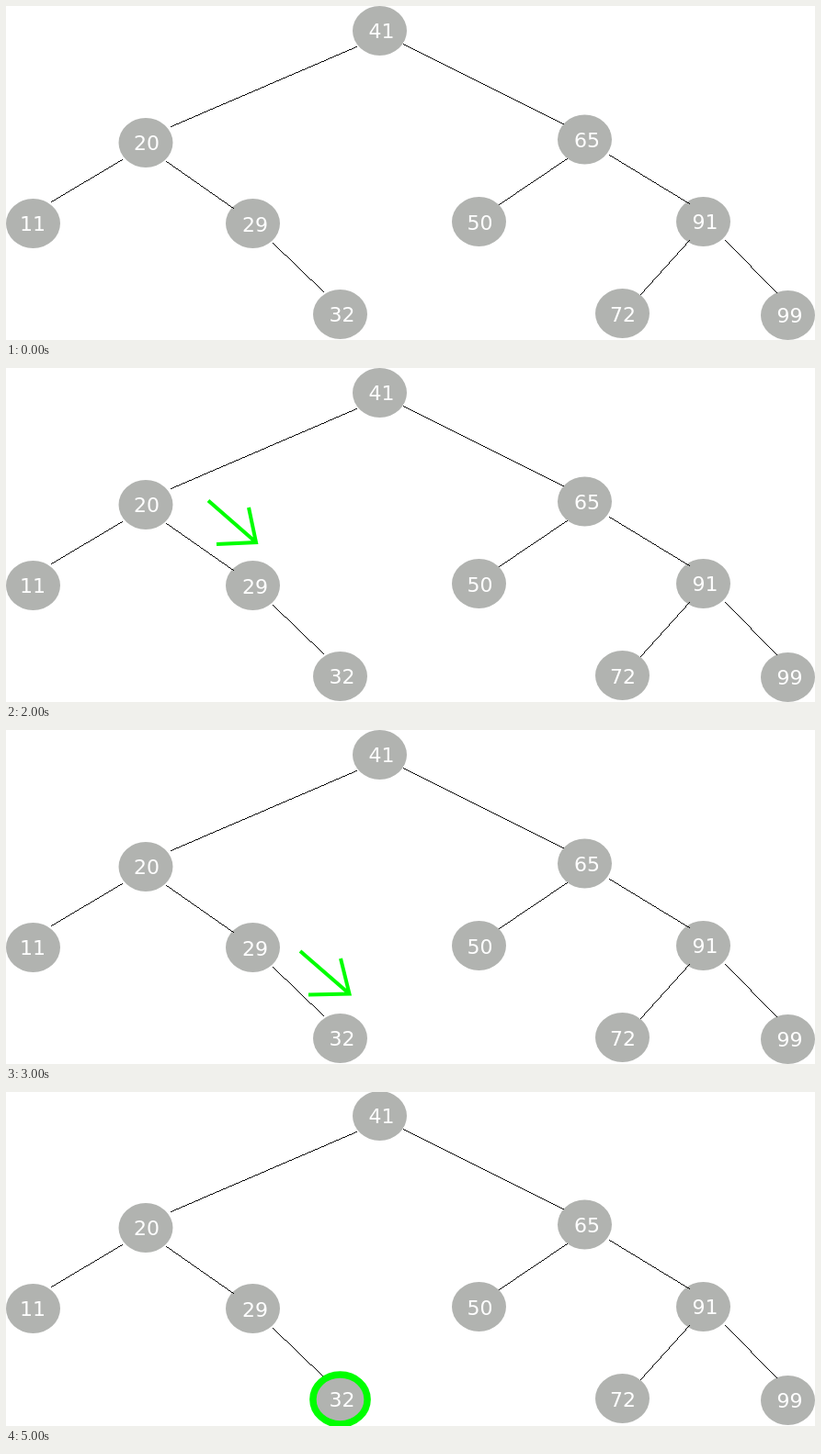
An HTML page with a canvas that plays this animation: 880x364 px, repeating every 6 s.

```html
<!DOCTYPE html>
<html lang="en">
<head>
<meta charset="utf-8">
<title>Binary search tree lookup</title>
<style>
html, body { margin: 0; width: 100%; height: 100%; overflow: hidden; background: #fff; }
canvas { display: block; }
</style>
</head>
<body>
<canvas id="stage" width="880" height="364"></canvas>
<script>
const ctx = document.getElementById('stage').getContext('2d');
const GREEN = '#00ff00', RED = '#ff0000', GRAY = '#b1b3b0';
const STEP = 1000;

// label, ellipse centre, text centre
const nodes = [
  ['41', 406.5, 27, 408.5, 27],
  ['20', 152, 149, 153, 149],
  ['65', 629.5, 145.5, 632, 145.5],
  ['11', 29.5, 237, 29, 236.5],
  ['29', 268.5, 237, 271, 238],
  ['50', 514.5, 235, 515.5, 236],
  ['91', 758.5, 235, 760.5, 235],
  ['32', 363.5, 336, 365.5, 336],
  ['72', 670.5, 335, 671, 335.5],
  ['99', 850.5, 337, 852.5, 336.5]
];

const edges = [
  [381, 44, 179, 131], [432, 41, 606, 128],
  [126, 167, 49, 213], [174, 169, 247, 220], [290, 258, 345, 311],
  [610, 166, 536, 216], [656, 162, 743, 215],
  [743, 255, 690, 314], [782, 255, 838, 312]
];

// Each step: vertical shift of the tree, then the marker drawn over it
const steps = [
  { shift: 0 },
  { shift: 0, mark: () => arrow(GREEN, [386, 68], [323, 99.5], [338, 60], [362, 106]) },
  { shift: 0, mark: () => arrow(GREEN, [220, 144.5], [272, 190], [264, 152], [229, 192]) },
  { shift: 0, mark: () => downRight(GREEN, 320, 241) },
  { shift: -26, mark: () => downRight(RED, 394, 341) },
  { shift: -1, mark: ring }
];

// Crisp one-pixel line
function hairline(x0, y0, x1, y1) {
  const n = Math.max(Math.abs(x1 - x0), Math.abs(y1 - y0));
  for (let i = 0; i <= n; i++) {
    const k = i / n;
    ctx.fillRect(Math.round(x0 + (x1 - x0) * k), Math.round(y0 + (y1 - y0) * k), 1, 1);
  }
}

function ellipse(x, y, rx, ry) {
  ctx.beginPath();
  ctx.ellipse(x, y, rx, ry, 0, 0, Math.PI * 2);
}

function arrow(color, tail, tip, barbA, barbB) {
  ctx.strokeStyle = color;
  ctx.lineWidth = 4;
  ctx.beginPath();
  ctx.moveTo(...tail);
  ctx.lineTo(...tip);
  ctx.moveTo(...barbA);
  ctx.lineTo(...tip);
  ctx.lineTo(...barbB);
  ctx.stroke();
}

function downRight(color, x, y) {
  arrow(color, [x, y], [x + 53.5, y + 46.5], [x + 44, y + 8], [x + 9, y + 47.5]);
}

function ring() {
  ctx.strokeStyle = GREEN;
  ctx.lineWidth = 7.5;
  ellipse(363.5, 335, 29.6, 27);
  ctx.stroke();
}

function drawTree(shift) {
  ctx.save();
  ctx.translate(0, shift);
  ctx.fillStyle = GRAY;
  for (const [, x, y] of nodes) {
    ellipse(x, y, 29.5, 27);
    ctx.fill();
  }
  ctx.fillStyle = '#000';
  for (const e of edges) hairline(...e);
  ctx.fillStyle = '#fff';
  ctx.font = '22px "DejaVu Sans", Verdana, sans-serif';
  ctx.textAlign = 'center';
  for (const [label, , , x, y] of nodes) ctx.fillText(label, x, y + 8);
  ctx.restore();
}

function draw(time) {
  const { shift, mark } = steps[Math.floor(time / STEP) % steps.length];
  ctx.fillStyle = '#fff';
  ctx.fillRect(0, 0, 880, 364);
  drawTree(shift);
  if (mark) mark();
}

function tick() {
  draw(performance.now());
  requestAnimationFrame(tick);
}
tick();
</script>
</body>
</html>
```
